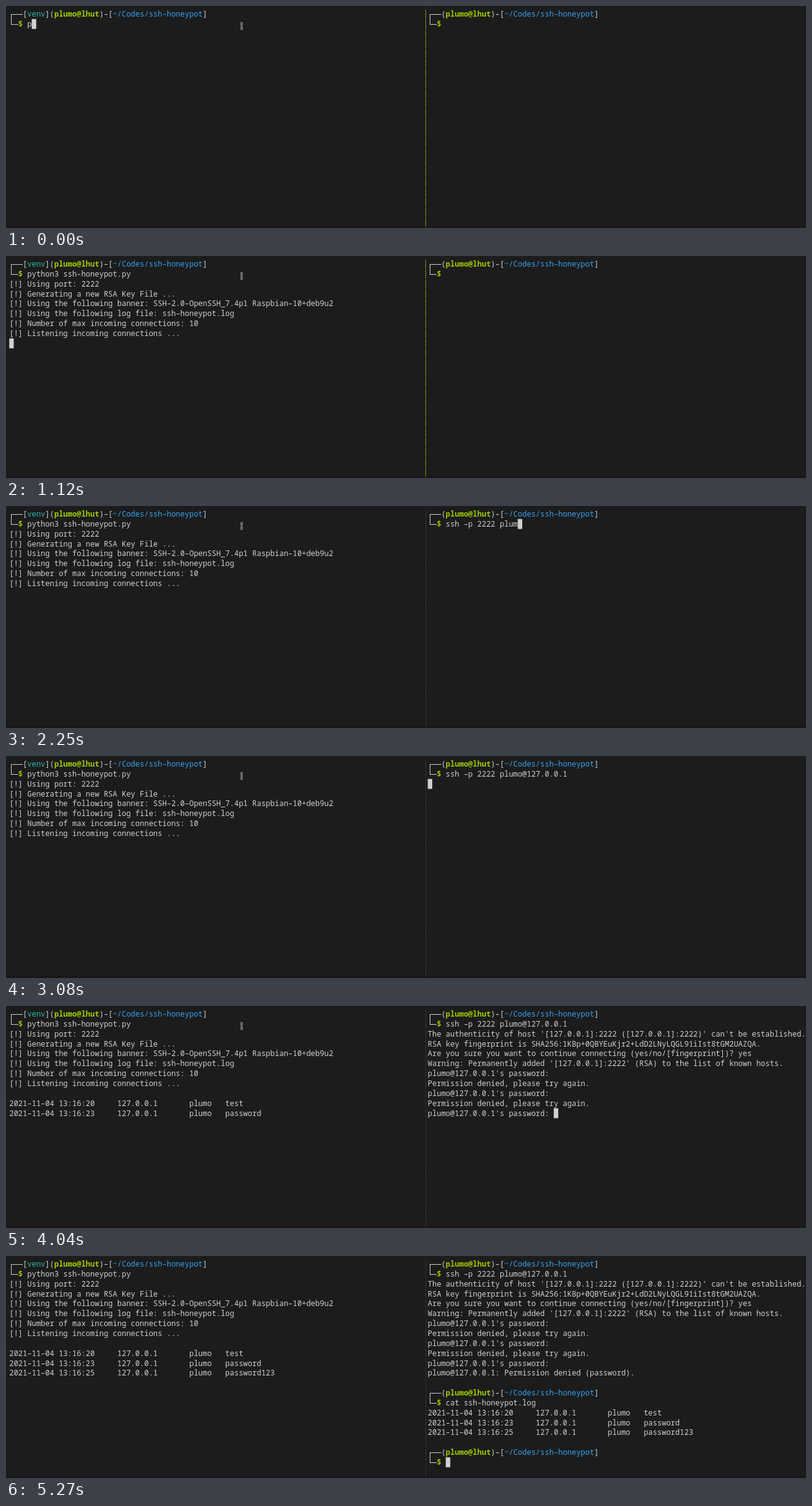
Recreate the animation shown at these times as an HTML page with a canvas. Size 1280x355 px, loop 5.74 s.

```html
<!DOCTYPE html>
<html lang="en">
<head>
<meta charset="utf-8">
<title>SSH honeypot demo</title>
<style>
html, body { margin: 0; width: 100%; height: 100%; overflow: hidden; background: #1c1c1c; }
canvas { display: block; }
</style>
</head>
<body>
<canvas id="stage" width="1280" height="355"></canvas>
<script>
const ctx = document.getElementById('stage').getContext('2d');
const LOOP = 5740, CELL_W = 7.2, CELL_H = 15.85, TOP = 5;
const LEFT_X = 5.2, RIGHT_X = LEFT_X + 93 * CELL_W;
const BG = '#1c1c1c', GREY = '#d0d0d0', GREEN = '#a0cc00', BLUE = '#35a2f0', CYAN = '#2bb8aa';
const USER = 'plumo', HOST = 'lhut', TARGET = USER + '@127.0.0.1';

// A line is a string or a list of [text, color, bold] runs.
const promptTop = venv => [
  ['┌──', GREY], ...(venv ? [['[', GREY], ['venv', CYAN], [']', GREY]] : []),
  ['(', GREY], [USER + '@' + HOST, GREEN, true], [')-[', GREY],
  ['~/Codes/ssh-honeypot', BLUE], [']', GREY]
];
const promptLine = command => [['└─', GREY], ['$', GREEN, true], [' ' + command, GREY]];

const attempts = [[3630, '20', 'test'], [4040, '23', 'password'], [4370, '25', 'password123']];
const logLine = ([, second, password]) =>
  ('2021-11-04 13:16:' + second).padEnd(24) + '127.0.0.1'.padEnd(16) + USER.padEnd(8) + password;

function leftLines(t) {
  const command = 'python3 ssh-honeypot.py ';
  const typed = t < 780 ? Math.floor(t / 70) + 1 : command.length;
  const lines = [promptTop(true), promptLine(command.slice(0, typed))];
  if (t >= 920) lines.push('[!] Using port: 2222', '[!] Generating a new RSA Key File ...');
  if (t >= 1120) lines.push(
    '[!] Using the following banner: SSH-2.0-OpenSSH_7.4p1 Raspbian-10+deb9u2',
    '[!] Using the following log file: ssh-honeypot.log',
    '[!] Number of max incoming connections: 10',
    '[!] Listening incoming connections ...');
  if (t >= 850) lines.push('');
  return lines.concat(attempts.filter(a => t >= a[0]).map(logLine));
}

function rightLines(t) {
  const typed = t < 1260 ? 0 : Math.floor((t - 1260) / 70) + 1 + (t >= 1890);
  const lines = [promptTop(), promptLine(('ssh -p 2222 ' + TARGET).slice(0, typed))];
  if (t < 3080) return lines;
  if (t < 3150) return [...lines, ''];

  const answered = Math.max(0, Math.floor((t - 3150) / 70));
  lines.push(
    "The authenticity of host '[127.0.0.1]:2222 ([127.0.0.1]:2222)' can't be established.",
    'RSA key fingerprint is SHA256:1KBp+0QBYEuKjr2+LdD2LNyLQGL91iIst8tGM2UAZQA.',
    'Are you sure you want to continue connecting (yes/no/[fingerprint])? ' + 'yes'.slice(0, answered));
  if (t < 3430) return lines;

  const ask = TARGET + "'s password: ";
  lines.push("Warning: Permanently added '[127.0.0.1]:2222' (RSA) to the list of known hosts.", ask);
  for (const [time] of attempts.slice(0, 2))
    if (t >= time) lines.push('Permission denied, please try again.', ask);
  if (t < 4370) return lines;

  const command = 'cat ssh-honeypot.log ';
  const keys = t < 4630 ? 0 : Math.floor((t - 4630) / 71.25) + 1;
  lines.push(TARGET + ': Permission denied (password).', '',
    promptTop(), promptLine(command.slice(0, keys < 9 ? keys : command.length)));
  if (t >= 5270) lines.push(...attempts.map(logLine), '', promptTop(), promptLine(''));
  return lines;
}

function drawBox(char, x, y) {
  const midX = Math.floor(x + CELL_W / 2), midY = Math.round(y + CELL_H / 2);
  const start = char === '─' ? x : midX;
  ctx.fillRect(start, midY, x + CELL_W - start, 1);
  if (char === '┌') ctx.fillRect(midX, midY, 1, y + CELL_H - midY);
  if (char === '└') ctx.fillRect(midX, y, 1, midY - y);
}

// Draws one line and returns the x where it ends.
function drawLine(line, x, y) {
  const runs = typeof line === 'string' ? [[line, GREY]] : line;
  for (const [text, color, bold] of runs) {
    ctx.fillStyle = color;
    ctx.font = (bold ? 600 : 500) + ' 12px "Noto Sans Mono", monospace';
    for (const char of text) {
      if ('┌└─'.includes(char)) drawBox(char, x, y);
      else if (char !== ' ') ctx.fillText(char === '-' ? '–' : char, x, y + 12);
      x += CELL_W;
    }
  }
  return x;
}

function drawPane(lines, x, active) {
  let end = x, y = TOP;
  lines.forEach((line, row) => {
    y = TOP + row * CELL_H;
    end = drawLine(line, x, y);
  });
  if (!active) return;
  ctx.fillStyle = GREY;
  ctx.fillRect(end, y, CELL_W, CELL_H);
}

function drawDivider(color) {
  ctx.fillStyle = color;
  for (let row = 0; row < 22; row++)
    ctx.fillRect(671, TOP + row * CELL_H + 0.6, 1, CELL_H - 1.2);
}

function drawPointer() {
  const beam = new Path2D('M375 27.5h1.5l.5.5.5-.5h1.5M377 28v8M375 36.5h1.5l.5-.5.5.5h1.5');
  for (const [width, color] of [[2.6, '#c4c4c4'], [1, '#1c1c1c']]) {
    ctx.lineWidth = width;
    ctx.strokeStyle = color;
    ctx.stroke(beam);
  }
}

function frame() {
  const t = performance.now() % LOOP, rightActive = t >= 1190;
  ctx.fillStyle = BG;
  ctx.fillRect(0, 0, 1280, 355);
  ctx.fillStyle = '#1a1517';
  ctx.fillRect(0, 352, 1280, 3);
  drawDivider(rightActive ? '#333333' : '#7c9a08');
  drawPane(leftLines(t), LEFT_X, !rightActive);
  drawPane(rightLines(t), RIGHT_X, rightActive);
  if (t < 5270) drawPointer();
  requestAnimationFrame(frame);
}
frame();
</script>
</body>
</html>
```
